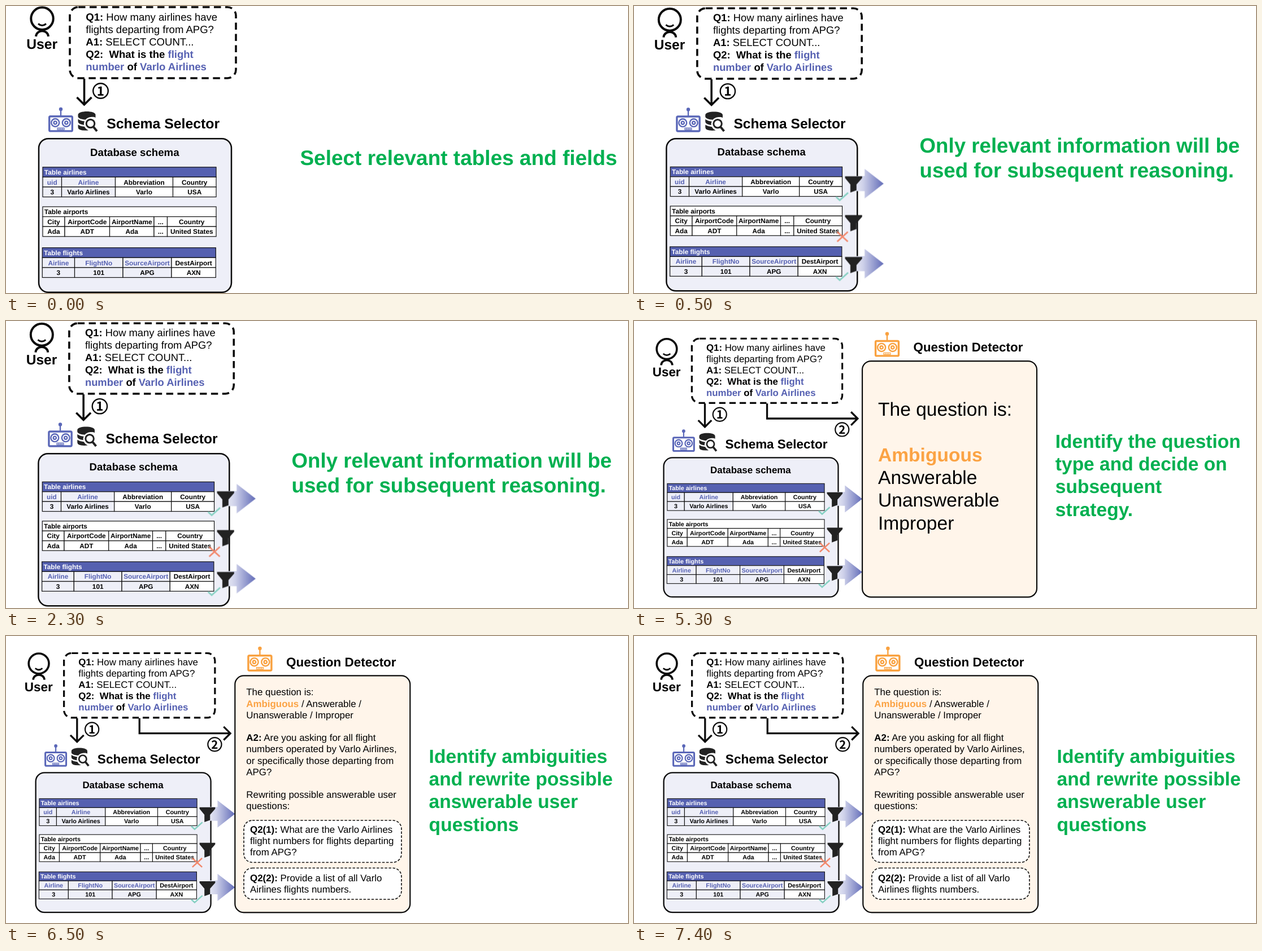
Recreate the animation shown at these times as an HTML page. Size 1101x509 px, loop 8 s.

```html
<!DOCTYPE html>
<html lang="en">
<head>
<meta charset="utf-8">
<title>Schema selection and question detection</title>
<style>
  html, body { margin: 0; width: 100%; height: 100%; overflow: hidden; background: #fff; }
  svg { display: block; width: 100vw; height: 100vh; font-family: "Liberation Sans", Arial, sans-serif; text-rendering: geometricPrecision; }
  .b { font-weight: bold; }
  .blue { fill: #5661b2; }
  .amber { fill: #fba344; }
  .big { fill: #00b050; font-weight: bold; }
  .ink { fill: none; stroke: #0a0a0a; stroke-width: 3.6; }
  .ring { fill: none; stroke: #0a0a0a; stroke-width: 2.4; }
  .mid { text-anchor: middle; }
  .cell { stroke: #111; stroke-width: 1.2; }
  .digit { font: bold 22.500px "Noto Sans CJK SC", "Noto Sans CJK JP", "Noto Sans", sans-serif; text-anchor: middle; }

  #board, .step { animation: 8s step-end infinite; }
  #board { animation-name: zoom; }
  #select { animation-name: select; }
  #filter { animation-name: filter; }
  #only { animation-name: only; }
  #detect { animation-name: detect; }
  #type { animation-name: type; }
  #rewrite { animation-name: rewrite; }

  @keyframes zoom {
    0% { transform: none; }
    6.25% { transform: matrix(.991, 0, 0, .991, -.1, 2.1); }
    43.75% { transform: matrix(.906, 0, 0, .906, 0, 29.4); }
    81.25%, 100% { transform: matrix(.909, 0, 0, .909, -.1, 28.6); }
  }
  @keyframes select { 0% { visibility: visible; } 6.25%, 100% { visibility: hidden; } }
  @keyframes filter { 0% { visibility: hidden; } 6.25%, 100% { visibility: visible; } }
  @keyframes only { 0% { visibility: hidden; } 6.25% { visibility: visible; } 43.75%, 100% { visibility: hidden; } }
  @keyframes detect { 0% { visibility: hidden; } 43.75%, 100% { visibility: visible; } }
  @keyframes type { 0% { visibility: hidden; } 43.75% { visibility: visible; } 81.25%, 100% { visibility: hidden; } }
  @keyframes rewrite { 0% { visibility: hidden; } 81.25%, 100% { visibility: visible; } }
</style>
</head>
<body>
<svg viewBox="0 0 1101 509" preserveAspectRatio="none">
  <defs>
    <linearGradient id="fade">
      <stop offset="0" stop-color="#f1f2fa"/>
      <stop offset=".35" stop-color="#cdd0e9"/>
      <stop offset="1" stop-color="#626cb8"/>
    </linearGradient>
    <path id="arrow" d="M390-13.500H412V-26.500L446 0 412 26.500V13.500H390Z" fill="url(#fade)"/>
    <path id="funnel" d="M377-13H407.500V-10L397.500 1.500V12L386.500 16V1.500L377-10Z" fill="#222"/>
    <path id="tick" d="M361 8.500 367.500 14.500 382.500 1" fill="none" stroke="#86d0c2" stroke-width="2.800"/>
    <g id="robot" fill="none" stroke="currentColor">
      <path d="M0-14V-24" stroke-width="2.400"/>
      <circle cy="-25.500" r="3.200" fill="currentColor" stroke="none"/>
      <rect x="-20.300" y="-12.800" width="40.600" height="26.200" rx="2" fill="#fff" stroke-width="3.400"/>
      <g stroke-width="2.400">
        <circle cx="-9.800" cy="-1.500" r="7"/>
        <circle cx="9.800" cy="-1.500" r="7"/>
        <circle cx="-9.800" cy="-1.500" r="2.600"/>
        <circle cx="9.800" cy="-1.500" r="2.600"/>
      </g>
      <path d="M-6 7.800H6V11H-6ZM-3 8V11M0 8V11M3 8V11" stroke-width="1.200"/>
    </g>
  </defs>

  <g id="board">
    <g class="ink">
      <circle cx="64" cy="22.300" r="19.700" stroke-width="4"/>
      <path d="M57 31.500Q64 37.500 71 31.500" stroke-width="3"/>
      <path d="M53 54C54 41 74 41 75 54" stroke-width="4"/>
      <rect x="113" y="2" width="294" height="126" rx="15" stroke-dasharray="12.500 7.500"/>
      <path d="M138.500 129V174M125.500 162 138.500 175 151.500 162"/>
    </g>
    <circle class="ring" cx="167.500" cy="150.500" r="13.300"/>
    <text class="digit" x="167.500" y="158.800">1</text>
    <text class="b" x="36.200" y="76" font-size="24.700">User</text>
    <g id="dialog"></g>

    <use href="#robot" x="97" y="208.500" color="#5a67b8"/>
    <g fill="#222">
      <path d="M127.500 193C127.500 185 158.500 185 158.500 193V198C156 196 145 196 141 201.500 134 201.500 127.500 199 127.500 196Z"/>
      <path d="M127.500 200.500Q132 204 139 204.500 137.500 207.500 138 211 127.500 209.500 127.500 205Z"/>
      <path d="M127.500 210.500Q132 213.500 139 214 141 218 146 220.500 127.500 222 127.500 215Z"/>
    </g>
    <g fill="none" stroke="#222">
      <circle cx="149.500" cy="208.500" r="7.300" stroke-width="3"/>
      <path d="M154.500 214 161 222" stroke-width="4"/>
    </g>
    <text class="b" x="178.200" y="217" font-size="24.800">Schema Selector</text>

    <rect x="58" y="235.200" width="341" height="272.600" rx="17" fill="#eeeff8" stroke="#0a0a0a" stroke-width="2.500"/>
    <text class="b mid" x="227.800" y="265.500" font-size="18.650">Database schema</text>
    <g id="tables" class="b" font-size="11.850"></g>

    <g id="filter" class="step">
      <use href="#arrow" y="315.700"/>
      <use href="#arrow" y="459"/>
      <use href="#funnel" y="315.700"/>
      <use href="#funnel" y="385"/>
      <use href="#funnel" y="460"/>
      <use href="#tick" y="331"/>
      <use href="#tick" y="474"/>
      <path d="M363 402 382 419.500M382 402 363 419.500" stroke="#f2886c" stroke-width="2.800"/>
    </g>

    <g id="detect" class="step">
      <path class="ink" d="M260 129V158.500H435M424 145.500 437 158.500 424 171.500"/>
      <circle class="ring" cx="406.500" cy="180" r="13.300"/>
      <text class="digit" x="406.500" y="188.300">2</text>
      <g transform="translate(494.500 21) scale(1.110)" color="#f9a13f"><use href="#robot"/></g>
      <text class="b" x="545.800" y="27.700" font-size="24.700">Question Detector</text>
      <rect x="446" y="46" width="341" height="462" rx="17" fill="#fff5ea" stroke="#0a0a0a" stroke-width="2.400"/>
    </g>
  </g>

  <g id="select" class="step"></g>
  <g id="only" class="step"></g>
  <g id="type" class="step"></g>
  <g id="rewrite" class="step">
    <g fill="#fff" stroke="#111" stroke-width="1.600" stroke-dasharray="4.500 2.600">
      <rect x="421" y="327" width="279" height="74.500" rx="15"/>
      <rect x="421" y="411.500" width="279" height="55.500" rx="15"/>
    </g>
  </g>
</svg>
<script>
  const $ = id => document.getElementById(id);
  const add = (id, markup) => $(id).insertAdjacentHTML('beforeend', markup);
  const span = cls => text => `<tspan class="${cls}">${text}</tspan>`;
  const bold = span('b'), blue = span('b blue'), amber = span('b amber');

  function write(id, x, y, size, pitch, lines, cls = '') {
    add(id, lines.map((line, i) =>
      `<text class="${cls}" x="${x}" y="${y + i * pitch}" font-size="${size}">${line}</text>`).join(''));
  }

  // Columns: [right edge, field, value]; the first `picked` fields are relevant.
  function table(left, top, name, picked, cols) {
    const h = 17.6, right = cols[cols.length - 1][0];
    const box = (x, row, w, fill) =>
      `<rect class="cell" x="${x}" y="${top + row * h}" width="${w}" height="${h}" fill="${fill}"/>`;
    const base = row => top + row * h + 13.2;
    let out = box(left, 0, right - left, picked ? '#5560b0' : '#fff') +
      `<text x="${left + 2.8}" y="${base(0)}" fill="${picked ? '#fff' : '#000'}">Table ${name}</text>`;
    let x = left;
    cols.forEach(([end, ...words], i) => {
      words.forEach((word, r) => {
        out += box(x, r + 1, end - x, i < picked ? '#eeeff8' : '#fff') +
          `<text class="mid${i < picked && !r ? ' blue' : ''}" x="${(x + end) / 2}" y="${base(r + 1)}">${word}</text>`;
      });
      x = end;
    });
    add('tables', out);
  }

  table(65, 285.8, 'airlines', 2, [[98.5, 'uid', '3'], [193.5, 'Airline', 'Varlo Airlines'],
    [295.5, 'Abbreviation', 'Varlo'], [372, 'Country', 'USA']]);
  table(65, 356, 'airports', 0, [[104, 'City', 'Ada'], [183.5, 'AirportCode', 'ADT'],
    [262, 'AirportName', 'Ada'], [285.5, '...', '...'], [372, 'Country', 'United States']]);
  table(64.3, 428.7, 'flights', 3, [[121.5, 'Airline', '3'], [207, 'FlightNo', '101'],
    [293, 'SourceAirport', 'APG'], [371.3, 'DestAirport', 'AXN']]);

  write('dialog', 141.3, 25.5, 18.55, 22.2, [
    bold('Q1:') + ' How many airlines have',
    'flights departing from APG?',
    bold('A1:') + ' SELECT COUNT...',
    bold('Q2:&nbsp; What is the ') + blue('flight'),
    blue('number') + bold(' of ') + blue('Varlo Airlines')
  ]);

  write('select', 520.4, 282, 37, 0, ['Select relevant tables and fields'], 'big');
  write('only', 505.5, 259.7, 36.7, 44.2,
    ['Only relevant information will be', 'used for subsequent reasoning.'], 'big');
  write('type', 745.8, 224.7, 33.55, 40.3,
    ['Identify the question', 'type and decide on', 'subsequent', 'strategy.'], 'big');
  write('rewrite', 748.6, 224.7, 33.65, 40.3,
    ['Identify ambiguities', 'and rewrite possible', 'answerable user', 'questions'], 'big');

  write('type', 432, 168, 33.6, 40.3,
    ['The question is:', '', amber('Ambiguous'), 'Answerable', 'Unanswerable', 'Improper']);
  write('rewrite', 425.3, 105.3, 16.9, 20.2, [
    'The question is:',
    amber('Ambiguous') + ' / Answerable /',
    'Unanswerable / Improper',
    '',
    bold('A2:') + ' Are you asking for all flight',
    'numbers operated by Varlo Airlines,',
    'or specifically those departing from',
    'APG?',
    '',
    'Rewriting possible answerable user',
    'questions:'
  ]);
  write('rewrite', 432, 348.5, 16.9, 20.2, [
    bold('Q2(1):') + ' What are the Varlo Airlines',
    'flight numbers for flights departing',
    'from APG?'
  ]);
  write('rewrite', 432, 434.7, 16.9, 20.2, [
    bold('Q2(2):') + ' Provide a list of all Varlo',
    'Airlines flights numbers.'
  ]);
</script>
</body>
</html>
```
